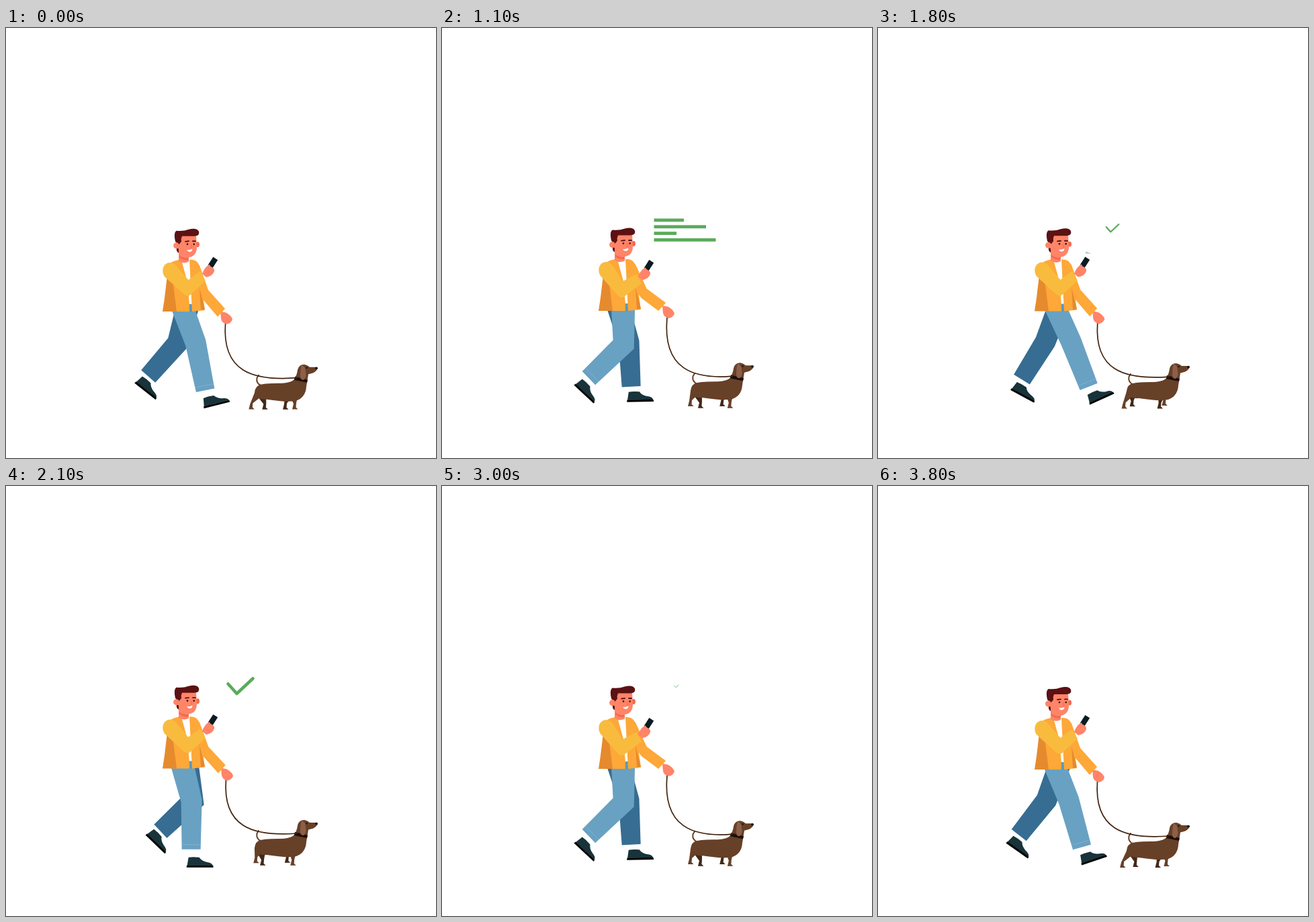
Write an HTML page with a canvas that moves like this. It is 640 px wide and 640 px high and loops after 3900 ms.

```html
<!DOCTYPE html>
<html lang="en">
<head>
<meta charset="utf-8">
<title>Dog walk</title>
<style>
html, body { margin: 0; width: 100%; height: 100%; overflow: hidden; background: #fff; }
canvas { display: block; }
</style>
</head>
<body>
<canvas id="stage" width="640" height="640"></canvas>
<script>
const ctx = document.getElementById('stage').getContext('2d');
const LOOP = 3900, STEP = 100, STRIDE = 1900, TAU = 2 * Math.PI, RAD = Math.PI / 180;

const wave = (t, period) => (1 - Math.cos(TAU * t / period)) / 2;
const ramp = (t, a, b) => {
  const x = Math.min(1, Math.max(0, (t - a) / (b - a)));
  return x * x * (3 - 2 * x);
};
// Cosine and sine weights of each overtone of the stride
const harmonics = (phase, mean, ...terms) => terms.reduce((sum, [a, b], i) => {
  const x = TAU * phase / STRIDE * (i + 1);
  return sum + a * Math.cos(x) + b * Math.sin(x);
}, mean);

function fill(color, d) {
  ctx.fillStyle = color;
  ctx.fill(new Path2D(d));
}
function line(color, width, d) {
  ctx.strokeStyle = color;
  ctx.lineWidth = width;
  ctx.lineCap = ctx.lineJoin = 'round';
  ctx.stroke(new Path2D(d));
}
function poly(color, ...points) {
  fill(color, 'M' + points.map(p => p.join(' ')).join('L') + 'Z');
}
function dot(color, x, y, rx, ry = rx) {
  ctx.fillStyle = color;
  ctx.beginPath();
  ctx.ellipse(x, y, rx, ry, 0, 0, TAU);
  ctx.fill();
}
function at(x, y, draw, scale = 1, angle = 0) {
  ctx.save();
  ctx.translate(x, y);
  ctx.rotate(angle);
  ctx.scale(scale, scale);
  draw();
  ctx.restore();
}

function drawShoe() {
  fill('#18333a', 'M1-3L3-15Q10-16 19-15Q22-10 30-8Q38-7 39-3Z');
  fill('#000', 'M0 0L.5-3.2H39Q40-3 40 0Z');
}

function drawLeg(phase, bob, { color, seam, thigh, shank, ankle }) {
  phase %= STRIDE;
  const thighTilt = RAD * harmonics(phase, 8.9, [16.5, -12.9], [-6.2, 2.9], [4.7, -.7], [-1.9, 0]);
  const shankTilt = harmonics(phase, -13.9, [28.5, 2.9], [2.6, -10.7], [-1.5, -1.8]);
  const grounded = ramp(phase, 30, 200) * (1 - ramp(phase, 620, 870));
  const shoeTilt = (-shankTilt - 3) * (1 - grounded);

  const hipX = 266.5 - 3.5 * Math.cos(TAU * (phase - 300) / STRIDE), hipY = 420 + bob;
  const ux = Math.cos(thighTilt), uy = -Math.sin(thighTilt);
  const vx = Math.cos(shankTilt * RAD), vy = -Math.sin(shankTilt * RAD);
  const kx = hipX - thigh * uy, ky = hipY + thigh * ux;
  const cx = kx - shank * vy, cy = ky + shank * vx;
  const miter = 15.5 / (1 + ux * vx + uy * vy);
  const mx = (ux + vx) * miter, my = (uy + vy) * miter;

  at(cx - 7 - .35 * shoeTilt, cy + ankle - .009 * Math.max(0, shoeTilt) ** 2, drawShoe, 1, shoeTilt * RAD);
  poly(color, [hipX - 17.5, hipY], [hipX + 17.5, hipY], [kx + mx, ky + my],
    [cx + 14 * vx, cy + 14 * vy], [cx - 14 * vx, cy - 14 * vy], [kx - mx, ky - my]);
  if (seam) {
    const sx = cx + 7 * vy, sy = cy - 7 * vx;
    line(seam, .6, `M${sx - 13 * vx} ${sy - 13 * vy}L${sx + 13 * vx} ${sy + 13 * vy}`);
  }
}

function drawLeashArm(u) {
  const ex = 4 * u, ey = -u, hx = 9.5 * u, hy = -8.5 * u;
  at(hx, hy, () => fill('#ff8468', 'M319 422L328 424Q336 429 337 434Q335 440 328 441Q321 439 320 433Z'));
  poly('#fda838', [280, 347], [288, 353], [301 + ex, 390 + ey], [326 + hx * .8, 418 + hy],
    [315 + hx * .8, 430 + hy], [293 + ex, 404 + ey], [280, 380]);
}

function drawJacket() {
  fill('#fff', 'M261 347H274L278 413H268Z');
  fill('#5c98b8', 'M272 411H278V422H272Z');
  fill('#fda838', 'M246 349Q253 345 261 345L270 378L273 412V422H250L242 380Z');
  fill('#e68a2e', 'M240 368L236 402L233 422H254L249 382Z');
  fill('#fda838', 'M273 345Q283 344 287 352L296 420L277 422Z');
  fill('#e68a2e', 'M288 387L290 420L296 419Z');
}

function drawHead() {
  fill('#ff8468', 'M257 332H272V348Q264 352 257 347Z');
  fill('#f26a4a', 'M258 339Q265 344 272 342V345Q264 347 258 341Z');
  dot('#f4694c', 285, 322.5, 3, 4);
  fill('#ff8468', 'M257 308H283L284 328Q283 341 270 342Q257 340 256 328Z');
  fill('#5c1113', 'M252 318Q249 304 254 302Q264 303 272 300Q284 297 287 303Q289 309 281 310H262Q260 314 261 318L257 323Z');
  fill('#5c1113', 'M254 327L257 329V335Q253 333 254 327Z');
  dot('#ff8468', 253.5, 324, 4.5);
  line('#5c1113', 1.8, 'M267 318L272 317.4M278 317.4L282 317.4');
  dot('#2a1414', 270, 322, 1.3);
  dot('#2a1414', 279.7, 322, 1.3);
  line('#f26a4a', 1, 'M275.5 322L277 326.5L275 327');
  fill('#fff', 'M269 330.5Q273 331 277.5 329Q277 333.5 273 333.5Q270 333 269 330.5Z');
}

function drawPhoneArm(u) {
  const dy = 5.5 * u, ex = 269.5 - 3 * u, ey = 399 + 3.5 * u;
  at(308, 349 + dy, () => {
    ctx.fillStyle = '#0b1b22';
    ctx.fillRect(-4.1, -7, 8.2, 14);
  }, 1, .57);
  at(0, dy, () => fill('#ff8468', 'M292 366Q295 357 301 353Q304 351 304 355Q311 357 310 362Q308 369 298 371Z'));
  fill('#f9bb3e', `M236 370C230 360 235 349 245 349Q251 350 256 357L${ex + 2} ${ey - 24}` +
    `L289 ${362 + dy}L297 ${376 + dy}L${ex + 4} ${ey - 1}Q${ex} ${ey + 1} ${ex - 4} ${ey - 2}Z`);
}

function dogLeg(color, left, right, top, x, y) {
  poly(color, [left, top], [right, top], [x + 6, y - 9], [x + 5.5, y - 3], [x + 8.5, y], [x, y], [x + 2, y - 8]);
}

function drawDogLegs(color, phase, bob) {
  const hind = TAU * (phase - 40) / 950, front = TAU * (phase - 60) / 950;
  const ground = 568 + bob * .8, swing = Math.cos(front);
  dogLeg(color, 370, 387, 543 + bob, 371 - 10 * Math.cos(hind) + 2.5 * Math.sin(2 * hind),
    ground - 4 * Math.max(0, Math.sin(hind)));
  dogLeg(color, 419 + 4 * swing, 430 + 4 * swing, 548 + bob, 419 + 7 * swing,
    ground - 5 * Math.max(0, -Math.sin(front)));
}

function drawDog(phase) {
  const bob = -4.4 * wave(phase - 10, 475);
  drawDogLegs('#432818', phase + 475, bob);
  drawDogLegs('#674028', phase, bob);
  at(0, bob, () => {
    line('#674028', 2, 'M379 532Q372 529 373.5 521L376 517');
    fill('#674028', 'M370 548Q369 536 376 532Q382 529 405 529Q424 529 429 523Q433 517 434 509' +
      'Q436 501 444 501Q449 502 452 505L462 505Q465 507 462 510Q459 514 450 515.5L447 534' +
      'Q446 550 432 555Q420 558 388 553Q378 554 370 548Z');
    fill('#1a0f0c', 'M430 519L449 524L448 528L429 524Z');
    fill('#8c5f48', 'M440 502Q446 504 446 512Q448 520 443 524Q438 524 438 519Q438 508 440 502Z');
    dot('#1a0f0c', 447.5, 506, 1.2);
    dot('#1a0f0c', 462, 506.5, 2, 1.7);
  });
  return bob;
}

function drawLeash(u, manBob, dogBob) {
  const x = 326.5 + 9 * u, y = 440 - 8.5 * u + manBob, end = 521 + dogBob;
  line('#41230f', 1.7, `M${x} ${y}C${x - 5 - 2 * u} ${end - 10} ${x + 39} ${end + 5} 433 ${end}`);
}

function drawMessage(t) {
  const scale = ramp(t, 640, 1000) * (1 - ramp(t, 1450, 1874));
  at(308.5 + 53 * scale, 337.5 - 36.7 * scale, () => {
    ctx.fillStyle = '#5aab5a';
    [44.5, 77.5, 33.5, 92].forEach((width, i) => ctx.fillRect(-46, -17.2 + 9.8 * i, width, 4.8));
  }, scale);
}

function drawTick(t) {
  const scale = ramp(t, 1700, 1900) * (1 - ramp(t, 2800, 3070));
  at(349, 298, () => line('#5aab5a', 4.6, 'M-18.5-3.5L-5.5 11L18.5-11.5'), scale);
}

const FAR_LEG = { color: '#376d92', thigh: 51, shank: 66, ankle: 23 };
const NEAR_LEG = { color: '#69a1c3', seam: '#8fbdd6', thigh: 52, shank: 72, ankle: 27 };

function draw(t) {
  const phase = Math.max(t, 50), u = wave(phase, STRIDE), lift = wave(phase, STRIDE / 2), bob = -4.2 * lift;
  ctx.clearRect(0, 0, 640, 640);
  const dogBob = drawDog(phase);
  drawLeash(u, bob, dogBob);
  drawLeg(phase + STRIDE / 2, bob, FAR_LEG);
  drawLeg(phase, bob, NEAR_LEG);
  at(0, bob, () => {
    drawLeashArm(u);
    drawJacket();
    at(0, -2 * lift, drawHead);
    drawPhoneArm(u);
  });
  drawMessage(t);
  drawTick(t);
}

const start = performance.now();
function tick() {
  const t = (performance.now() - start) % LOOP;
  draw(Math.floor(t / STEP) * STEP);
  requestAnimationFrame(tick);
}
tick();
</script>
</body>
</html>
```
